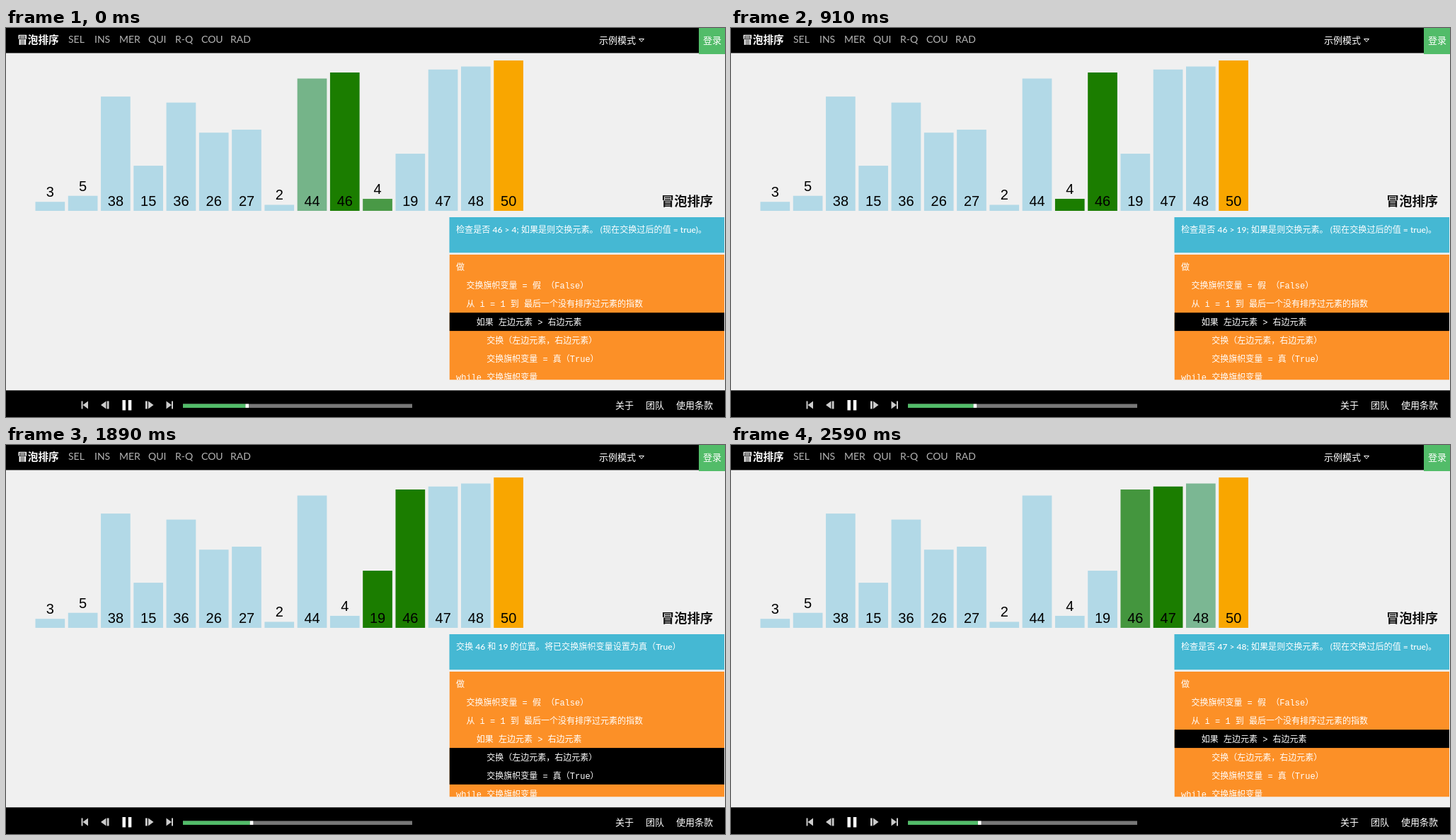
An HTML page that plays this animation: 1016 by 551 pixels, repeating every 2.66 s.

```html
<!DOCTYPE html>
<html lang="zh-CN">
<head>
<meta charset="utf-8">
<style>
  html, body { margin: 0; width: 100%; height: 100%; overflow: hidden; background: #f0f0f0; }
  svg { display: block; }
  text { font: 500 13px Lato, "Noto Sans CJK SC", "Noto Sans CJK", sans-serif; fill: #fff; }
  #nav text { font-size: 14px; font-weight: 400; fill: #b4b4b4; }
  #code text { font: 500 12px "Liberation Mono", "Noto Sans CJK SC", "Noto Sans CJK", monospace; }
  #bars text { font: 20px "Liberation Sans", Arial, sans-serif; fill: #000; text-anchor: middle; }
  #message { font-size: 12.1px; }
</style>
</head>
<body>
<svg width="1016" height="551" viewBox="0 0 1016 551">
  <rect width="1016" height="551" fill="#f0f0f0"/>
  <rect width="1016" height="35.5"/>
  <rect x="979" width="37" height="37" fill="#52bc69"/>
  <text x="16" y="21.8" style="font-size:14.7px;font-weight:700">冒泡排序</text>
  <g id="nav"></g>
  <text x="838" y="21.5">示例模式</text>
  <path d="M894.5 15.5h7l-3.5 4z" fill="none" stroke="#fff"/>
  <text x="985" y="22.3">登录</text>

  <g id="bars"></g>

  <text x="926" y="251.8" style="font-size:18.3px;font-weight:700;fill:#111">冒泡排序</text>
  <rect x="626.5" y="268" width="388.5" height="50.3" fill="#45b8d3"/>
  <text id="message" x="636" y="290.4"></text>
  <svg x="626.5" y="321" width="388.5" height="177.3">
    <rect width="389" height="178" fill="#fc9027"/>
    <rect id="mark" width="389"/>
    <g id="code"></g>
  </svg>

  <rect y="513.3" width="1016" height="38"/>
  <g fill="#ccc">
    <path d="M106.500 528.500h2v11h-2zM116 528.500v11l-7.500-5.500z"/>
    <path d="M141.500 528.500v11l-7.500-5.500zM142.700 528.500h2.800v11h-2.800z"/>
    <path d="M197 528.500h2.800v11h-2.800zM201 528.500v11l7.500-5.500z"/>
    <path d="M226.500 528.500v11l7.500-5.500zM234 528.500h2v11h-2z"/>
  </g>
  <path d="M164.500 527h4.500v14.500h-4.500zM172.800 527h4.500v14.500h-4.500z" fill="#fff"/>
  <rect x="250" y="532.5" width="324" height="5.500" fill="#777"/>
  <rect id="done" x="250" y="532.5" height="5.500" fill="#52bc69"/>
  <rect id="handle" y="532.5" width="4.500" height="5.500" fill="#fff"/>
  <text x="861" y="538.5">关于</text>
  <text x="904" y="538.5">团队</text>
  <text x="947" y="538.5">使用条款</text>
</svg>
<script>
const LOOP = 2660, TICK = 70, FADE = 300;
const BLUE = [178, 217, 231], GREEN = [27, 125, 0], ORANGE = [249, 166, 0];
const $ = id => document.getElementById(id);

function add(parent, tag, attrs, text = '') {
  const el = document.createElementNS('http://www.w3.org/2000/svg', tag);
  set(el, attrs);
  el.textContent = text;
  return parent.appendChild(el);
}
function set(el, attrs) {
  for (const key in attrs) el.setAttribute(key, attrs[key]);
}

const check = (at, a, b) => ({ at, row: 3, rows: 1,
  text: `检查是否 ${a} > ${b}; 如果是则交换元素。 (现在交换过后的值 = true)。` });
const swap = (at, a, b) => ({ at, row: 4, rows: 2,
  text: `交换 ${a} 和 ${b} 的位置。将已交换旗帜变量设置为真（True）` });
const steps = [
  check(-160, 46, 4), swap(377, 46, 4), check(905, 46, 19),
  swap(1455, 46, 19), check(1958, 46, 47), check(2468, 47, 48)
];

// Steps at which a bar turns green and back to blue
const lit = { 44: [null, 0], 46: [null, 5], 4: [0, 2], 19: [2, 4], 47: [4, null], 48: [5, null] };

const navX = [88, 125, 160, 201, 239, 276, 317];
['SEL', 'INS', 'MER', 'QUI', 'R-Q', 'COU', 'RAD'].forEach((name, i) =>
  add($('nav'), 'text', { x: navX[i], y: 21 }, name));

[[0, '做'], [2, '交换旗帜变量 = 假 （False）'], [2, '从 i = 1 到 最后一个没有排序过元素的指数'],
 [4, '如果 左边元素 > 右边元素'], [6, '交换（左边元素，右边元素）'],
 [6, '交换旗帜变量 = 真（True）'], [0, 'while 交换旗帜变量']].forEach(([indent, line], i) =>
  add($('code'), 'text', { x: 9.5 + indent * 7.2, y: 22.1 + i * 25.9 }, line));

const bars = [3, 5, 38, 15, 36, 26, 27, 2, 44, 46, 4, 19, 47, 48, 50].map((value, slot) => {
  const group = add($('bars'), 'g', {}), height = value * 4.26, top = 259 - height;
  const rect = add(group, 'rect', { y: top, width: 41.7, height });
  add(group, 'text', { x: 20.9, y: value > 5 ? 251.8 : top - 7 }, value);
  return { value, slot, group, rect };
});

function ease(t, step, lead = 0) {
  const u = Math.min(1, Math.max(0, (t + lead - steps[step].at) / FADE));
  return u < 0.5 ? 4 * u ** 3 : 1 - 4 * (1 - u) ** 3;
}

function slotOf({ value, slot }, t) {
  if (value === 46) return slot + ease(t, 1) + ease(t, 3);
  if (value === 4) return slot - ease(t, 1);
  if (value === 19) return slot - ease(t, 3);
  return slot;
}

function colorOf(value, t) {
  if (value === 50) return ORANGE;
  if (!lit[value]) return BLUE;
  const [on, off] = lit[value];
  const green = (on === null ? 1 : ease(t, on, 13)) - (off === null ? 0 : ease(t, off));
  return BLUE.map((c, i) => Math.round(c + (GREEN[i] - c) * green));
}

function draw(t) {
  for (const bar of bars) {
    set(bar.group, { transform: `translate(${41.5 + slotOf(bar, t) * 46.27} 0)` });
    set(bar.rect, { fill: `rgb(${colorOf(bar.value, t)})` });
  }
  const index = steps.filter(s => s.at <= t).length - 1, step = steps[index];
  const x = 338.5 + index * 2.1;
  $('message').textContent = step.text;
  set($('mark'), { y: 4.6 + step.row * 25.87, height: step.rows * 25.87 });
  set($('done'), { width: x - 250 });
  set($('handle'), { x });
}

const start = performance.now();
function frame() {
  const t = (performance.now() - start) % LOOP;
  draw(Math.floor(t / TICK) * TICK);
  requestAnimationFrame(frame);
}
frame();
</script>
</body>
</html>
```
